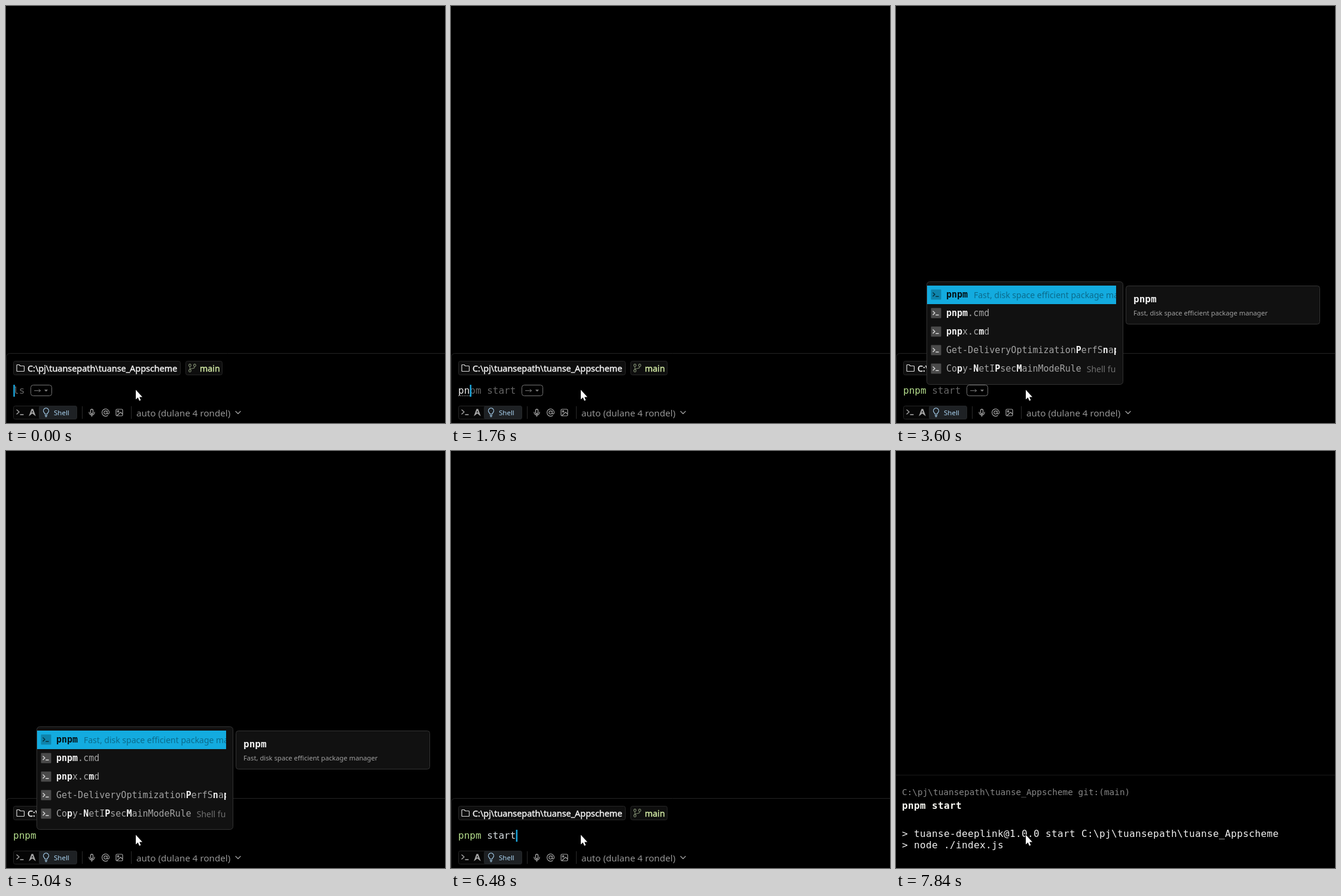
These frames come from a looping animation (734 by 698 pixels, 8000 ms). An HTML page with a canvas:

```html
<!DOCTYPE html>
<html lang="en">
<head>
<meta charset="utf-8">
<title>Terminal autosuggest</title>
<style>
  html, body { margin: 0; width: 100%; height: 100%; overflow: hidden; background: #000; }
  canvas { display: block; }
</style>
</head>
<body>
<canvas id="stage" width="734" height="698"></canvas>
<script>
const ctx = document.getElementById('stage').getContext('2d');
const LOOP = 8000;
const MONO = '"DejaVu Sans Mono", monospace';
const SANS = '"Noto Sans", "Open Sans", sans-serif';
const CELL = 16 * 0.602;
const ACCENT = '#1ba6dc';
const GREEN = '#b4dd8c';
const PATH = 'C:\\pj\\tuansepath\\tuanse_Appscheme';

// time, typed text, suggested rest, caret visible, command recognised
const STEPS = [
  [0, '', 'ls', true, false],
  [720, 'p', '', true, false],
  [960, 'p', 'npm start', true, false],
  [1680, 'pn', 'pm start', true, false],
  [2320, 'pnp', 'm start', true, false],
  [2800, 'pnpm', ' start', true, false],
  [2880, 'pnpm', ' start', true, true],
  [3600, 'pnpm', ' start', false, true],
  [4320, 'pnpm', ' start', true, true],
  [4560, 'pnpm', ' start', false, true],
  [5040, 'pnpm ', '', false, true],
  [5280, 'pnpm ', 'start', true, true],
  [5760, 'pnpm s', 'tart', true, true],
  [6240, 'pnpm star', 't', true, true],
  [6480, 'pnpm start', '', true, true]
];
const MENU_ON = 3600, MENU_OFF = 5200, RUN = 7280, OUTPUT = 7520, CARET_OFF = 7840;

function text(str, x, y, color, font, spacing = 0) {
  ctx.font = font;
  ctx.letterSpacing = spacing + 'px';
  ctx.fillStyle = color;
  ctx.fillText(str, x, y);
}
const mono = (s, x, y, color, size = 16, bold = false, gap = 0) =>
  text(s, x, y, color, `${bold ? 'bold ' : ''}${size}px ${MONO}`, gap);
const sans = (s, x, y, color, size) => text(s, x, y, color, `${size}px ${SANS}`);

// Regular weight with a thin outline, between regular and bold.
function semibold(s, x, y, color, size) {
  sans(s, x, y, color, size);
  ctx.strokeStyle = color;
  ctx.lineWidth = 0.45;
  ctx.lineJoin = 'round';
  ctx.strokeText(s, x, y);
}

function rect(x, y, w, h, color) {
  ctx.fillStyle = color;
  ctx.fillRect(x, y, w, h);
}

function box(x, y, w, h, r, fill, stroke) {
  ctx.beginPath();
  ctx.roundRect(x + 0.5, y + 0.5, w - 1, h - 1, r);
  if (fill) { ctx.fillStyle = fill; ctx.fill(); }
  if (stroke) { ctx.strokeStyle = stroke; ctx.lineWidth = 1; ctx.stroke(); }
}

function icon(d, x, y, color, width = 1.3) {
  ctx.save();
  ctx.translate(x, y);
  ctx.strokeStyle = color;
  ctx.lineWidth = width;
  ctx.lineCap = ctx.lineJoin = 'round';
  ctx.stroke(new Path2D(d));
  ctx.restore();
}

function solid(d, x, y, color) {
  ctx.save();
  ctx.translate(x, y);
  ctx.fillStyle = color;
  ctx.fill(new Path2D(d));
  ctx.restore();
}

function chips() {
  box(12, 594, 280, 24, 3, '#0e0e0e', '#262626');
  icon('M1 2Q1 1 2 1H5L7 3H12.5Q13.5 3 13.5 4V11Q13.5 12 12.5 12H2Q1 12 1 11Z', 17, 599.5, '#d6d6d6', 1.2);
  semibold(PATH, 36, 612, '#f0f0f0', 14.4);

  box(300, 594, 62, 24, 3, '#0e0e0e', '#262626');
  icon('M2.5 5V10M2.5 1A2 2 0 1 1 2.49 1M2.5 10A2 2 0 1 1 2.49 10M10.5 1A2 2 0 1 1 10.49 1M10.5 5Q10.5 8 7 8.2Q3.5 8.5 2.5 10', 305, 598.5, '#6f7a62');
  semibold('main', 324, 612, '#cfe6a2', 14.2);
}

function toolbar() {
  box(12, 669, 107, 23, 3, '#060606', '#242424');
  box(55, 669, 64, 23, 3, '#1e2124', '#242628');
  icon('M0 0L4 3.5L0 7M6 8H11', 18, 676, '#b0b0b0');
  solid('M4.6 0H7.4L11.8 12L9.6 10.6L6 7.4L2.4 10.6L.2 12ZM6 2.6L4.6 6.4L6 5.4L7.4 6.4Z', 38, 674.5, '#a6a6a6');
  icon('M3 9Q3 7.7 1.8 6.6A4.4 4.4 0 1 1 8.2 6.6Q7 7.7 7 9ZM3.4 11.4H6.6M4 13.3H6', 62, 674, '#a9d2f0', 1.2);
  sans('Shell', 80, 685, '#a9d2f0', 11.5);

  rect(127, 670, 1, 21, '#2b2b2b');
  rect(209, 670, 1, 21, '#2b2b2b');
  icon('M5 1A2 2 0 0 1 7 3V6.5A2 2 0 0 1 3 6.5V3A2 2 0 0 1 5 1ZM.5 6A4.5 4.5 0 0 0 9.5 6M5 10.5V13', 138.5, 674, '#a6a6a6');
  icon('M9.2 6.5A2.7 2.7 0 1 1 9.2 6.4M9.2 3.8V7.2Q9.4 9 10.9 8.8Q12.5 8.5 12.5 6.5A6 6 0 1 0 10 11.4', 160, 674, '#a6a6a6', 1.2);
  icon('M2 .5H10Q11.5 .5 11.5 2V10Q11.5 11.5 10 11.5H2Q.5 11.5 .5 10V2Q.5 .5 2 .5ZM2 11L8 5.5L11.5 8.5M4 2.8A1.2 1.2 0 1 1 3.99 2.8', 183.5, 674.5, '#a6a6a6', 1.2);
  sans('auto (dulane 4 rondel)', 218, 687, '#959595', 15.15);
  icon('M0 0L4 4L8 0', 384, 678.5, '#959595', 1.5);
}

function acceptKey(x) {
  box(x, 634, 36, 19, 4, null, '#747474');
  icon('M0 3H10M7.5 .8L10 3L7.5 5.2', x + 6.5, 640.8, '#858585', 1);
  solid('M0 0H6L3 3.2Z', x + 23, 642.3, '#858585');
}

function commandLine([, typed, ghost, caret, known]) {
  const col = n => 12 + n * CELL;
  const base = 649;
  mono(typed.slice(0, 4), 12, base, known ? GREEN : '#eeeeee');
  mono(typed.slice(4), col(4), base, '#d8dee2');
  if (typed && !known && ghost) {
    for (let x = 12; x < col(typed.length) - 1; x += 3) rect(x, 652, 2, 1, '#8a8a8a');
  }
  if (ghost) {
    mono(ghost, col(typed.length), base, '#666666');
    acceptKey(Math.round(col((typed + ghost).length) + 9.7));
  }
  if (caret) rect(col(typed.length) + 0.3, 634, 2.5, 20, ACCENT);
}

// Letters between asterisks are the matched ones.
function matched(str, x, y) {
  str.split('*').forEach((part, i) => {
    mono(part, x, y, i % 2 ? '#f2f2f2' : '#a3a3a3', 15, i % 2 === 1);
    x += part.length * 15 * 0.602;
  });
  return x;
}

function menu() {
  const items = ['', '*pnpm*.cmd', '*pnp*x.c*m*d', 'Get-DeliveryOptimization*P*erfS*n*a*p*', 'Co*p*y-*N*etI*P*sec*M*ainModeRule'];
  const about = 'Fast, disk space efficient package manager';
  box(51, 461, 329, 173, 5, '#111111', '#333333');
  rect(52, 468, 316, 31, '#13abdf');
  ctx.save();
  ctx.beginPath();
  ctx.rect(52, 462, 316, 170);
  ctx.clip();
  items.forEach((item, i) => {
    const y = 488 + i * 31, first = i === 0;
    box(58, y - 14, 18, 18, 1, first ? '#0e84ac' : '#4a4a4a');
    icon('M0 0L3 2.8L0 5.6M4.8 6.2H9', 62, y - 8, first ? '#06323f' : '#d5d5d5', 1.5);
    if (first) {
      mono('pnpm', 84, y, '#041014', 15, true);
      sans(about, 130, y + 1, '#0b6b8c', 14);
    } else {
      const end = matched(item, 84, y);
      if (i === 4) sans('Shell function', end + 9, y + 1, '#707070', 14);
    }
  });
  ctx.restore();

  box(384, 468, 325, 65, 4, '#111111', '#333333');
  mono('pnpm', 397, 496, '#f2f2f2', 16, true);
  sans(about, 397, 518, '#a2a2a2', 11.2);
}

function prompt(t) {
  box(0, 581, 760, 140, 6, null, '#232323');
  chips();
  commandLine(STEPS.findLast(s => s[0] <= t));
  toolbar();
  if (t >= MENU_ON && t < MENU_OFF) menu();
}

function run(t) {
  const done = t >= OUTPUT;
  const drop = done ? 0 : 77;
  const gap = 10 - CELL;
  rect(0, 542 + drop, 734, 1, '#191919');
  mono(PATH + ' git:(main)', 10, 576 + drop, '#858585', 14.4);
  mono('pnpm start', 10, 599 + drop, '#fbfbf5', 16, true, gap);
  if (done) {
    mono('> tuanse-deeplink@1.0.0 start ' + PATH, 10, 646, '#f1f1f1', 16, false, gap);
    mono('> node ./index.js', 10, 665, '#f1f1f1', 16, false, gap);
  }
  if (t < CARET_OFF) rect(10, 688, 10, 10, ACCENT);
}

function pointer() {
  const d = 'M0 0V16L3.6 12.8L5.9 18.2L8.3 17.2L6.1 12H11Z';
  icon(d, 217, 642.5, '#000', 1.4);
  solid(d, 217, 642.5, '#fff');
}

function frame(now) {
  const t = now % LOOP;
  rect(0, 0, 734, 698, '#000');
  if (t < RUN) prompt(t); else run(t);
  pointer();
}

const start = performance.now();
function tick() {
  frame(performance.now() - start);
  requestAnimationFrame(tick);
}
tick();
</script>
</body>
</html>
```
